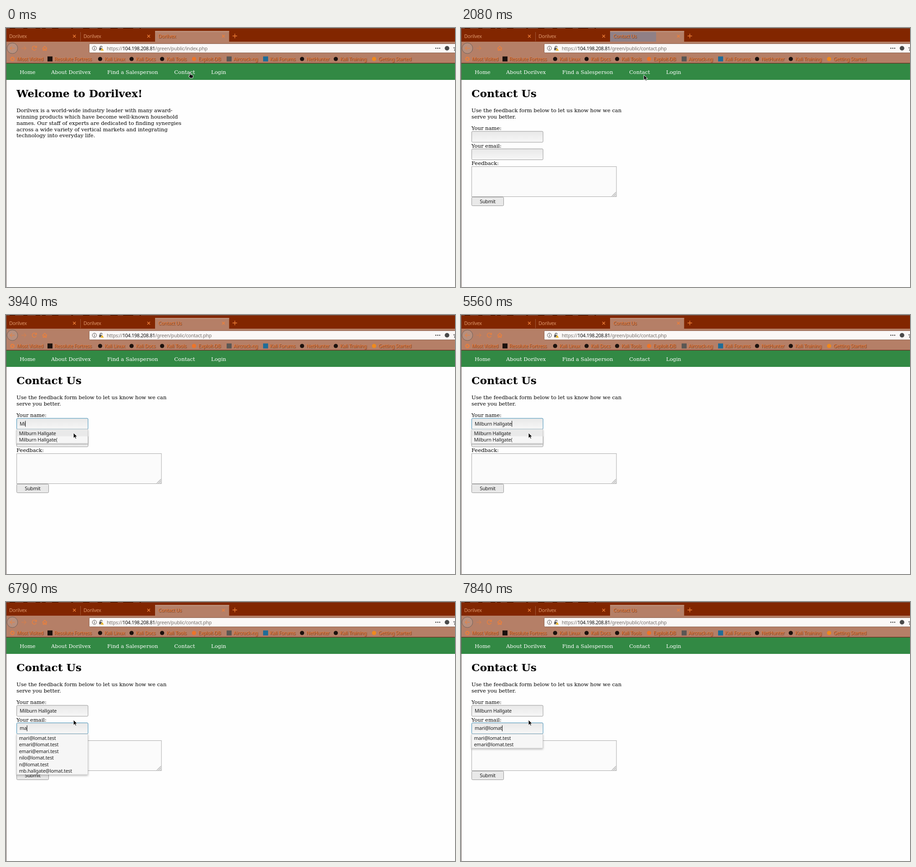
These frames come from a looping animation (985x569 px, 8 s). An HTML page:

```html
<!DOCTYPE html>
<html lang="en">
<head>
<meta charset="utf-8">
<title>Contact form</title>
<style>
html, body { margin: 0; width: 100%; height: 100%; overflow: hidden; background: #fefefe; }
svg { display: block; width: 985px; height: 569px; }
text { white-space: pre; }
.ui { font: 10.7px "Noto Sans", "Open Sans", sans-serif; letter-spacing: -.3px; }
.form { font: 10.7px "Noto Sans", "Open Sans", sans-serif; letter-spacing: -.18px; fill: #1c1c1c; }
.page { font: 11.5px "DejaVu Serif", serif; }
.head { font: bold 23.2px "DejaVu Serif", serif; }
.mark { fill: #ee7a34; text-shadow: 1px 1px 1px #4a1a04b0; }
.dim { fill: #dd9468; }
.line { fill: none; stroke: #f08038; stroke-width: 1.3; }
</style>
</head>
<body>
<svg id="stage" viewBox="0 0 985 569"></svg>
<script>
const LOOP = 8000;
const NAME = "Milburn Hallgate";
const MAIL = "mari@lomat.test";
const COMPANY = "Dorilvex";

const nameSteps = [[3810, 1], [3940, 2], [4090, 3], [4210, 4], [4360, 5], [4480, 6], [4630, 7],
  [4910, 9], [5050, 11], [5170, 12], [5290, 14], [5440, 15], [5560, 16]];
const mailSteps = [[6550, 1], [6790, 2], [6910, 3], [7030, 4], [7180, 5], [7450, 6], [7580, 7],
  [7720, 8], [7840, 10]];
const nameHints = [NAME, NAME + "("];
const mailHints = [MAIL, "emari@lomat.test", "emari@emari.test", "nilo@lomat.test",
  "n@lomat.test", "mb.hallgate@lomat.test"];

const text = (x, y, cls, s, more = "") => `<text x="${x}" y="${y}" class="${cls}" ${more}>${s}</text>`;
const rect = (x, y, w, h, fill, more = "") =>
  `<rect x="${x}" y="${y}" width="${w}" height="${h}" fill="${fill}" ${more}/>`;
const dot = (x, y, r, fill, more = "") => `<circle cx="${x}" cy="${y}" r="${r}" fill="${fill}" ${more}/>`;
const path = (d, more = 'class="line"') => `<path d="${d}" ${more}/>`;
const group = (id, body, more = "") => `<g id="${id}" ${more}>${body}</g>`;
const lines = (x, y, list) => list.map((s, i) => text(x, y + i * 13.85, "page", s)).join("");
const cross = (x, y, r) => path(`M${x - r} ${y - r}l${2 * r} ${2 * r}m0 ${-2 * r}l${-2 * r} ${2 * r}`);

function tabs() {
  const close = [150, 313, 477].map(x => cross(x, 18, 3)).join("");
  return rect(0, 0, 985, 30, "#822600") + rect(0, 0, 985, 1, "#6d5a52") +
    path("M8 .5h12m18 0h9m18 0h10m4 0h8m14 0h14m28 0h4m22 0h14m18 0h10m18 0h16m12 0h22m14 0h3",
      'stroke="#2c0d02" fill="none"') +
    rect(327, 7, 162.5, 24, "#b57f67") +
    rect(327, 8, 101, 22, "#908086", 'id="tint"') +
    rect(327, 6.5, 162.5, 2, "#c49c8a") +
    rect(163, 9, 1, 20, "#a2583a") +
    text(7, 22, "ui dim", COMPANY) + text(170, 22, "ui dim", COMPANY) +
    text(334, 22, "ui mark", "", 'id="tab"') + dot(340, 18, 1, "#f08038", 'id="spinner"') +
    close + path("M502 12.5v10m-5-5h10");
}

function toolbar() {
  const home = "M80 45l5-5 5 5M81.500 44v5h2.500v-3h2v3h2.500v-5";
  const lock = path("M206.500 44v-2a2.200 2.200 0 0 1 4.400 0", 'fill="none" stroke="#555" stroke-width="1.3"') +
    rect(204.5, 43.5, 7, 5.5, "#555") + path("M211 43.500l4 6.500h-8z", 'fill="#e8b11c" stroke="#f8f5f3" stroke-width=".6"');
  return rect(0, 30, 985, 48, "#b57f67") +
    dot(14, 44.5, 11.7, "#b78f7d", 'stroke="#6f625c"') +
    path("M19 44.500H9m4.500-4.500L9 44.500l4.500 4.500", 'class="line" opacity=".7"') +
    path("M34 44.500h10m-4.500-4.500l4.500 4.500-4.500 4.500", 'class="line" opacity=".45"') +
    group("reload", path("M66.300 46a4.600 4.600 0 1 1-.6-4.500M67 39v3.800h-3.800")) +
    group("stop", cross(62, 44.5, 3.5), 'opacity=".5"') +
    path(home) +
    rect(182.5, 34.5, 815, 20, "#fbf8f7", 'rx="2" stroke="#8d6553"') +
    dot(194, 44.5, 4.6, "none", 'stroke="#555"') + rect(193.4, 43.7, 1.2, 3.6, "#555") + rect(193.4, 41.7, 1.2, 1.2, "#555") +
    lock +
    `<text x="221" y="48.500" class="ui" fill="#77716d">https://<tspan fill="#111">104.198.208.81</tspan>/green/public/<tspan id="file"></tspan></text>` +
    [943, 947.2, 951.4].map(x => dot(x, 44.5, 1.3, "#444")).join("") +
    dot(967.5, 44.5, 5, "#4a4a4a") +
    path("M987.500 39l1.700 3.800 4.200.4-3 2.800.8 4.300-3.700-2.200-3.700 2.200.8-4.300-3-2.800 4.200-.4z", 'fill="none" stroke="#444"');
}

function bookmarks() {
  const kali = "#1b110d";
  const list = [["Most Visited", 24, ""], ["Resolute Fortress", 106, kali, 1], ["Kali Linux", 216, kali],
    ["Kali Docs", 285, kali], ["Kali Tools", 352, kali], ["Exploit-DB", 422, "#ee7428"],
    ["Aircrack-ng", 499, "#5b5754", 1], ["Kali Forums", 579, "#1f6d98", 1], ["NetHunter", 659, kali],
    ["Kali Training", 733, kali], ["Getting Started", 817, "#f08a1c"]];
  const gear = dot(14, 68, 3, "none", 'class="line"') +
    dot(14, 68, 4.6, "none", 'stroke="#f08038" stroke-width="1.4" stroke-dasharray="1.8"');
  return gear + list.map(([s, x, fill, square]) => {
    const icon = !fill ? "" : square ? rect(x - 15, 62.5, 11, 11, fill) : dot(x - 9.5, 68, 4.6, fill);
    return icon + text(x, 71.7, "ui mark", s);
  }).join("");
}

function nav() {
  const items = [["Home", 30], ["About " + COMPANY, 99], ["Find a Salesperson", 222], ["Contact", 369], ["Login", 450]];
  return rect(0, 76.7, 985, 1.3, "#5c3020") + rect(0, 78, 985, 36, "#328944") +
    items.map(([s, x]) => text(x, 101, "page", s, 'fill="#fff"')).join("") +
    rect(368.5, 89.5, 46.5, 15, "none", 'id="focus" stroke="#e4f0e6" stroke-dasharray="1 1"');
}

function pages() {
  const field = (id, y) => rect(23.5, y, 156.5, 24, "url(#shade)", `id="${id}Box" rx="2"`) +
    text(30, y + 15.8, "form", "", `id="${id}Text"`);
  const welcome = text(23, 152, "head", `Welcome to ${COMPANY}!`) + lines(23, 185, [
    COMPANY + " is a world-wide industry leader with many award-",
    "winning products which have become well-known household",
    "names. Our staff of experts are dedicated to finding synergies",
    "across a wide variety of vertical markets and integrating",
    "technology into everyday life."]);
  const contact = text(23, 152, "head", "Contact Us") +
    lines(23, 185, ["Use the feedback form below to let us know how we can", "serve you better."]) +
    text(23, 224, "page", "Your name:") + field("name", 227) +
    text(23, 262.5, "page", "Your email:") + field("mail", 265.5) +
    text(23, 301, "page", "Feedback:") +
    rect(23.5, 304.5, 317.5, 66, "#fbfbfb", 'stroke="#aaa"') +
    path("M331 369.500l9-9m-5.500 9l5.500-5.500m-2 5.500l2-2", 'stroke="#777" fill="none"') +
    rect(23.5, 371.5, 70, 19, "#e9e9e9", 'rx="2" stroke="#989898"') +
    text(58.5, 385, "form", "Submit", 'text-anchor="middle"') +
    rect(0, 0, 1, 13, "#111", 'id="caret"');
  return group("welcome", welcome) + group("contact", contact);
}

function pointers() {
  const ink = 'fill="#0a0a0a" stroke="#fff" stroke-width=".9" stroke-linejoin="round"';
  return group("hand", path("M402.500 98.500q1.500-1 2.200.6v3.300l5 1q1 .4.900 1.700l-.8 4.900h-6l-3.200-4q-.6-1.500 1.900-.9z", ink)) +
    group("arrow", path("M0 0v11.500l2.700-2.400 1.800 3.900 2-.9-1.800-3.800h3.700z", ink)) +
    group("beam", path("M149 240.500h2.300l.7.700.7-.7h2.300m-3 0v13m-3 0h2.300l.7-.7.7.7h2.300", 'fill="none" stroke="#111"'));
}

const $ = id => document.getElementById(id);
$("stage").innerHTML = `<defs>
  <linearGradient id="shade" x2="0" y2="1"><stop stop-color="#e8e8e8"/><stop offset="1" stop-color="#f7f7f7"/></linearGradient>
  <filter id="soft" x="-10%" y="-20%" width="120%" height="150%"><feDropShadow dx="0" dy="2" stdDeviation="2" flood-opacity=".3"/></filter>
</defs>` + rect(0, 0, 985, 569, "#fefefe") + tabs() + toolbar() + bookmarks() + nav() + pages() +
  group("popup", "") + pointers() + rect(0, 0, 1, 569, "#6a605b");

const show = (id, on) => $(id).setAttribute("visibility", on ? "visible" : "hidden");
const set = (id, s) => { if ($(id).textContent !== s) $(id).textContent = s; };
const typed = (steps, t) => steps.reduce((n, [at, count]) => t >= at ? count : n, 0);

function drawPopup(items, y, hover) {
  const key = items.join() + y;
  const box = $("popup");
  if (box.dataset.key === key) return;
  box.dataset.key = key;
  box.innerHTML = !items.length ? "" :
    rect(23.5, y, 156, items.length * 14.5 + 2, "#f6f6f6", 'stroke="#c9c9c9" stroke-width=".8" filter="url(#soft)"') +
    (hover ? rect(24, y + 1, 155, 14.5, "#e9e9e9") : "") +
    items.map((s, i) => text(28.5, y + 12.6 + i * 14.5, "form", s)).join("");
}

function movePointer(t) {
  const step = Math.min(5, Math.floor((t - 2380) / 120) + 1);
  let x = 401, y = 103;
  if (t >= 2230) {
    const k = step > 0 ? step / 5 : 0, e = k * k * (3 - 2 * k);
    x = 400 - 248 * e;
    y = 119 + 128 * e;
  }
  if (t >= 3130) { x = 148; y = 259; }
  const beam = t >= 2860 && t < 3130;
  show("hand", t < 1960);
  show("beam", beam);
  show("arrow", t >= 1960 && !beam);
  $("arrow").setAttribute("transform", `translate(${x} ${y})`);
}

function render(t) {
  const loaded = t >= 1960, loading = t >= 1650 && !loaded;
  show("welcome", !loaded);
  show("contact", loaded);
  show("focus", t >= 150 && !loaded);
  show("tint", t >= 2080 && t < 2230);
  show("spinner", loading);
  show("reload", t < 1650 || t >= 2230);
  show("stop", t >= 1810 && t < 2080);
  $("spinner").setAttribute("cx", t < 1810 ? 340 : 342);
  $("tab").setAttribute("x", loading ? 350 : 334);
  set("tab", loaded ? "Contact Us" : COMPANY);
  set("file", loaded ? "contact.php" : "index.php");

  const name = NAME.slice(0, typed(nameSteps, t));
  const mail = MAIL.slice(0, typed(mailSteps, t));
  set("nameText", name);
  set("mailText", mail);

  const active = t < 2860 ? "" : t < 5840 ? "name" : "mail";
  for (const id of ["name", "mail"])
    $(id + "Box").setAttribute("stroke", id === active ? "#3e8db5" : "#999");
  $("caret").setAttribute("visibility", active ? "inherit" : "hidden");
  if (active) {
    const value = active === "name" ? name : mail;
    const width = value ? $(active + "Text").getComputedTextLength() : 0;
    $("caret").setAttribute("x", 30 + width);
    $("caret").setAttribute("y", active === "name" ? 232.5 : 271);
  }

  if (name && t < 5690) drawPopup(nameHints, 251, true);
  else if (mail) {
    const query = t < 7300 ? mail.slice(0, 2) : t < 7580 ? mail.slice(0, 5) : mail;
    drawPopup(mailHints.filter(s => s.includes(query)), 290, false);
  } else drawPopup([], 0, false);

  movePointer(t);
}

const start = performance.now();
function tick() {
  render((performance.now() - start) % LOOP);
  requestAnimationFrame(tick);
}
tick();
</script>
</body>
</html>
```
